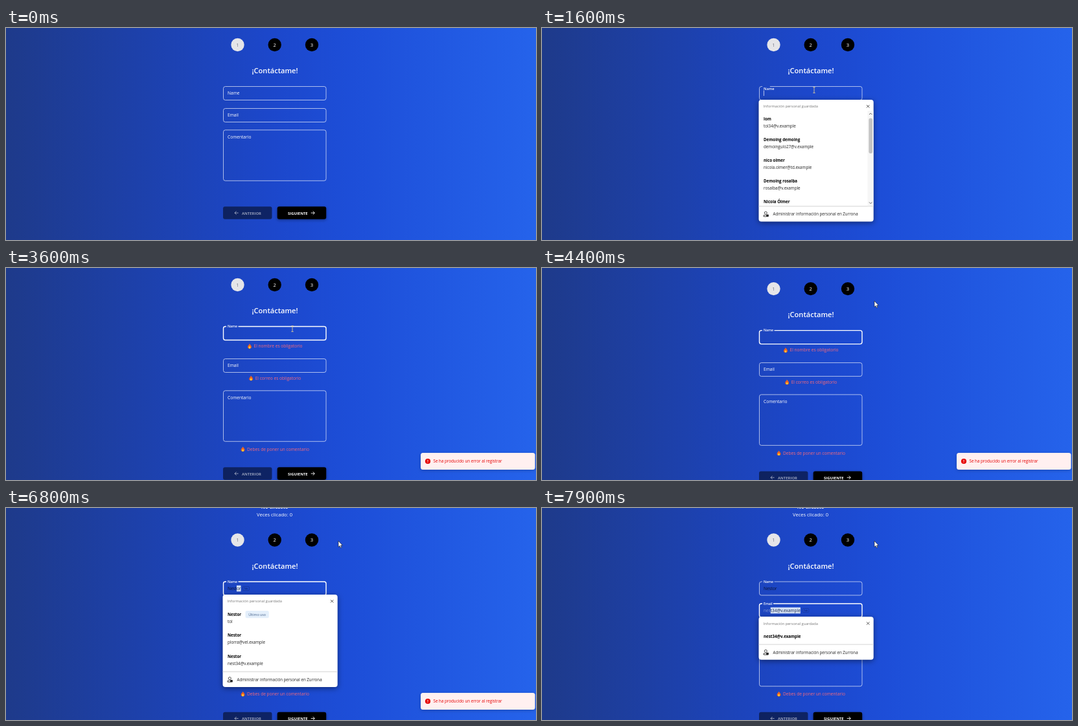
These frames come from a looping animation (818 px wide and 328 px high, 8000 ms). An HTML page with a canvas:

```html
<!DOCTYPE html>
<html lang="es">
<head>
<meta charset="utf-8">
<title>Formulario de contacto</title>
<style>
html, body { margin: 0; width: 100%; height: 100%; overflow: hidden; background: #1d4ed8; }
canvas { display: block; width: 818px; height: 328px; }
</style>
</head>
<body>
<canvas id="stage"></canvas>
<script>
const W = 818, H = 328, LOOP = 8000, STEP = 100;
const FONT = '"Open Sans", "Noto Sans", sans-serif';
const canvas = document.getElementById('stage');
const dpr = window.devicePixelRatio || 1;
canvas.width = W * dpr;
canvas.height = H * dpr;
const ctx = canvas.getContext('2d');

const CLICK_NAME = 1520, CLICK_OUT = 2100, SUBMIT = 2900, ACCEPT = 7100, FOCUS_EMAIL = 7200;
const NAME_KEYS = [5900, 6200, 6500, 6700];
const EMAIL_KEYS = [7500, 7700, 7800];
const NAME = 'Nestor', EMAIL = 'nest34@v.example';

const SAVED = [
  ['lom', 'tol34@v.example'],
  ['Demoing demoing', 'demoingulo27@v.example'],
  ['nico olmer', 'nicola.olmer@td.example'],
  ['Demoing rosalba', 'rosalba@v.example'],
  ['Nicola Ólmer', '']
];
const MATCHES = [[NAME, 'tol', true], [NAME, 'plorra@vel.example'], [NAME, EMAIL]];

// Pointer path: time, x, y
const PATH = [
  [1000, 584, 322], [1450, 420, 96], [1700, 420, 96], [2050, 520, 230], [2450, 520, 230],
  [2750, 458, 284], [2950, 458, 284], [3500, 442, 94], [3800, 442, 94], [4250, 513, 51]
];

const clamp = v => Math.max(0, Math.min(1, v));
const prog = (t, start, dur) => clamp((t - start) / dur);
const easeOut = p => 1 - (1 - p) * (1 - p);
const easeInOut = p => p * p * (3 - 2 * p);
const mix = (a, b, p) => a + (b - a) * p;
const count = (keys, t) => keys.filter(k => t >= k).length;

// y is the middle of the capital letters
function text(s, x, y, size, color, weight = 400, align = 'left') {
  ctx.font = `${weight} ${size}px ${FONT}`;
  ctx.textAlign = align;
  ctx.fillStyle = color;
  ctx.fillText(s, x, y + size * 0.35);
}

function textWidth(s, size) {
  ctx.font = `400 ${size}px ${FONT}`;
  return ctx.measureText(s).width;
}

function box(x, y, w, h, r) {
  ctx.beginPath();
  ctx.roundRect(x, y, w, h, r);
}

function fillBox(x, y, w, h, r, color) {
  box(x, y, w, h, r);
  ctx.fillStyle = color;
  ctx.fill();
}

function disc(x, y, r, color) {
  ctx.beginPath();
  ctx.arc(x, y, r, 0, Math.PI * 2);
  ctx.fillStyle = color;
  ctx.fill();
}

function lines(color, width, ...paths) {
  ctx.beginPath();
  for (const p of paths)
    for (let i = 0; i < p.length; i += 2) ctx[i ? 'lineTo' : 'moveTo'](p[i], p[i + 1]);
  ctx.strokeStyle = color;
  ctx.lineWidth = width;
  ctx.stroke();
}

function shadow(blur, dy, color) {
  ctx.shadowBlur = blur * dpr;
  ctx.shadowOffsetY = dy * dpr;
  ctx.shadowColor = color;
}

function background() {
  const g = ctx.createLinearGradient(0, 0, W, 0);
  g.addColorStop(0, '#1e3a8a');
  g.addColorStop(0.5, '#1c47cb');
  g.addColorStop(0.65, '#1d4ed8');
  g.addColorStop(1, '#2563eb');
  ctx.fillStyle = g;
  ctx.fillRect(0, 0, W, H);
}

function header(s) {
  text('No clicaste', 414.5, s - 25.5, 7.6, '#fff', 700, 'center');
  text('Veces clicado: 0', 414.5, s - 13.5, 7.6, '#fff', 400, 'center');
  [357.5, 414.7, 472].forEach((x, i) => {
    disc(x, 26 + s, 10.2, i ? '#000' : '#e5e5e8');
    text(String(i + 1), x, 26 + s, 7.6, i ? '#fff' : '#777a85', 400, 'center');
  });
  text('¡Contáctame!', 415, 66.5 + s, 11.1, '#fff', 600, 'center');
}

function field(label, y, h, float, focused, notch) {
  ctx.save();
  if (float > 0) {
    ctx.beginPath();
    ctx.rect(0, 0, W, H);
    ctx.rect(340, y - 3, notch * float, 6);
    ctx.clip('evenodd');
  }
  box(335.5, y + 0.5, 158.5, h - 1, 3);
  ctx.strokeStyle = focused ? '#fff' : 'rgba(255,255,255,.8)';
  ctx.lineWidth = focused ? 1.4 : 0.8;
  ctx.stroke();
  ctx.restore();
  text(label, 342, mix(y + 11, y + 0.3, float), mix(6.6, 5.2, float), '#fff', float > 0 ? 600 : 400);
}

function flame(x, y) {
  ctx.beginPath();
  ctx.moveTo(x - 0.6, y - 4);
  ctx.bezierCurveTo(x + 2, y - 2, x + 3.2, y, x + 2.9, y + 1.8);
  ctx.bezierCurveTo(x + 2.4, y + 4.3, x - 2.4, y + 4.3, x - 2.9, y + 1.8);
  ctx.bezierCurveTo(x - 3.1, y, x - 2, y - 0.8, x - 1.8, y - 1.8);
  ctx.quadraticCurveTo(x - 0.2, y - 1.6, x - 0.6, y - 4);
  ctx.fillStyle = '#f2641c';
  ctx.fill();
  ctx.beginPath();
  ctx.ellipse(x, y + 2, 1.4, 1.7, 0, 0, Math.PI * 2);
  ctx.fillStyle = '#ffd23c';
  ctx.fill();
}

function problem(s, y) {
  const x = 415 - (textWidth(s, 6.6) + 10) / 2;
  flame(x + 3.5, y);
  text(s, x + 10, y, 6.6, '#f8697a');
}

function arrow(x, y, dir, color) {
  const tip = x + dir * 2.8;
  lines(color, 0.9, [x - dir * 2.8, y, tip, y], [tip - dir * 2.6, y - 2.6, tip, y, tip - dir * 2.6, y + 2.6]);
}

function buttons(y) {
  fillBox(335, y, 75.5, 19.5, 3, 'rgba(0,0,0,.5)');
  arrow(355.8, y + 9.8, -1, 'rgba(255,255,255,.6)');
  text('ANTERIOR', 364, y + 10.2, 5.9, 'rgba(255,255,255,.55)', 700);
  ctx.save();
  shadow(4, 1.5, 'rgba(0,0,0,.35)');
  fillBox(418.7, y, 75.5, 19.5, 3, '#000');
  ctx.restore();
  text('SIGUIENTE', 435, y + 10.2, 5.9, '#fff', 700);
  arrow(473.5, y + 9.8, 1, '#fff');
}

// Typed letters followed by the selected completion and its key hint
function completion(full, n, y, color) {
  const size = 6.5, typed = full.slice(0, n), rest = full.slice(n);
  const x = 342 + textWidth(typed, size), w = textWidth(rest, size);
  text(typed, 342, y, size, color);
  fillBox(x, y - 4.7, w, 9.4, 0, '#d3e0f6');
  text(rest, x, y, size, '#1c2a4c');
  box(x + w + 3, y - 3, 10, 6, 1.5);
  ctx.strokeStyle = 'rgba(10,20,60,.45)';
  ctx.lineWidth = 0.5;
  ctx.stroke();
  text('Tab', x + w + 8, y, 3.6, 'rgba(10,20,60,.7)', 400, 'center');
}

function popup(y, h) {
  ctx.save();
  shadow(8, 2, 'rgba(0,0,0,.45)');
  fillBox(334.5, y, 177.2, h, 4, '#fff');
  ctx.restore();
  text('Información personal guardada', 341.7, y + 10.4, 5.73, '#767676');
  lines('#333', 0.8, [501, y + 8, 505.4, y + 12.4], [505.4, y + 8, 501, y + 12.4]);
  const base = y + h;
  lines('#d0d0d0', 0.9, [334.5, base - 23.7, 511.7, base - 23.7]);
  ctx.beginPath();
  ctx.arc(345.3, base - 13.4, 2, 0, Math.PI * 2);
  ctx.strokeStyle = '#222';
  ctx.lineWidth = 0.8;
  ctx.stroke();
  lines('#222', 0.8, [346.5, base - 7.6, 342, base - 7.8, 342, base - 9.8, 345.5, base - 9.8]);
  fillBox(346, base - 11, 3.8, 3.6, 0.8, '#222');
  text('Administrar información personal en Zurrona', 356.5, base - 11.4, 6.2, '#222');
}

function entry([title, detail, recent], y) {
  text(title, 342, y, 6.2, '#000', 700);
  if (detail) text(detail, 342, y + 11.2, 6.25, '#222');
  if (recent) {
    fillBox(369.5, y - 5.6, 36.3, 11.4, 2.5, '#e4effb');
    text('Último uso', 387.6, y + 0.2, 5.3, '#45628c', 400, 'center');
  }
}

function savedPopup(y) {
  popup(y, 188.5);
  ctx.save();
  ctx.beginPath();
  ctx.rect(334.5, y + 16, 177, 148.3);
  ctx.clip();
  SAVED.forEach((e, i) => entry(e, y + 30 + i * 32));
  ctx.fillStyle = '#f6f6f6';
  ctx.fillRect(502.5, y + 17, 9, 148);
  fillBox(504.4, y + 28.5, 5.6, 54.5, 2.8, '#c3c3c3');
  lines('#444', 0.8, [505, y + 23, 507.2, y + 20.8, 509.4, y + 23], [505, y + 158.5, 507.2, y + 160.7, 509.4, y + 158.5]);
  ctx.restore();
}

function toast(t) {
  const shown = easeOut(prog(t, SUBMIT + 50, 400)), left = easeInOut(prog(t, 6950, 300));
  const alpha = shown * (1 - left);
  if (!alpha) return;
  const y = 286 + 42 * (1 - shown) + 30 * left;
  ctx.save();
  ctx.globalAlpha = alpha;
  ctx.save();
  shadow(5, 1.5, 'rgba(0,0,0,.2)');
  fillBox(640, y, 176.5, 26, 3.5, '#fff0f0');
  ctx.restore();
  disc(651, y + 13, 4.1, '#e60000');
  ctx.fillStyle = '#fff0f0';
  ctx.fillRect(650.5, y + 10.7, 1, 2.9);
  ctx.fillRect(650.5, y + 14.4, 1, 1);
  text('Se ha producido un error al registrar', 659.5, y + 13, 6.25, '#e60000');
  ctx.restore();
}

function pointer(t) {
  if (t < PATH[0][0]) return;
  let [, x, y] = PATH[PATH.length - 1];
  for (let i = 1; i < PATH.length; i++) {
    const [t0, x0, y0] = PATH[i - 1], [t1, x1, y1] = PATH[i];
    if (t >= t0 && t < t1) {
      const p = easeInOut(prog(t, t0, t1 - t0));
      x = mix(x0, x1, p);
      y = mix(y0, y1, p);
      break;
    }
  }
  if (x > 335 && x < 494 && y > 90 && y < 112) {
    lines('#d6c79c', 0.9, [x - 1.7, y - 4.4, x + 1.7, y - 4.4], [x, y - 4.4, x, y + 4.4], [x - 1.7, y + 4.4, x + 1.7, y + 4.4]);
    return;
  }
  ctx.beginPath();
  [[0, 0], [0, 9.3], [2.1, 7.4], [3.5, 10.6], [5, 9.9], [3.6, 6.9], [6.3, 6.7]]
    .forEach(([dx, dy], i) => ctx[i ? 'lineTo' : 'moveTo'](x + dx, y + dy));
  ctx.closePath();
  ctx.fillStyle = '#fff';
  ctx.fill();
  ctx.strokeStyle = '#111';
  ctx.lineWidth = 0.6;
  ctx.stroke();
}

function caret(t, since, y) {
  if ((t - since) % 1000 < 500) lines('#fff', 0.7, [342.4, y - 4.2, 342.4, y + 4.2]);
}

function draw(t) {
  const scroll = 23.5 * easeInOut(prog(t, 4300, 300));
  const nameKeys = count(NAME_KEYS, t), emailKeys = count(EMAIL_KEYS, t);
  const failed = t >= SUBMIT, nameBad = failed && !nameKeys;
  const firstFocus = t >= CLICK_NAME && t < CLICK_OUT;
  const nameFocus = firstFocus || (failed && t < FOCUS_EMAIL);
  const since = failed ? SUBMIT : CLICK_NAME;

  let nameFloat = 0;
  if (failed) nameFloat = easeOut(prog(t, SUBMIT, 200));
  else if (t >= CLICK_NAME) nameFloat = easeOut(prog(t, CLICK_NAME, 200)) * (1 - easeOut(prog(t, CLICK_OUT, 200)));
  const emailFloat = easeOut(prog(t, FOCUS_EMAIL, 200));

  const nameY = 90 + scroll;
  const emailY = 124 + scroll + (nameBad ? 16 : 0);
  const noteY = emailY + 33.3 + (failed ? 16 : 0);

  background();
  header(scroll);
  field('Name', nameY, 22, nameFloat, nameFocus && nameFloat === 1, 18.5);
  field('Email', emailY, 22, emailFloat, t >= FOCUS_EMAIL, 17);
  field('Comentario', noteY, 79.5, 0, false, 0);
  if (nameBad) problem('El nombre es obligatorio', nameY + 31);
  if (failed) {
    problem('El correo es obligatorio', emailY + 46.5 - 16);
    problem('Debes de poner un comentario', noteY + 91);
  }
  buttons(noteY + 119);

  if (t >= ACCEPT) text(NAME, 342, nameY + 11, 6.5, '#0b1230');
  else if (nameKeys) completion(NAME, nameKeys, nameY + 11, '#0b1230');
  else if (nameFocus) caret(t, since, nameY + 10.8);

  if (emailKeys) completion(EMAIL, emailKeys, emailY + 11, '#8093cf');
  else if (t >= FOCUS_EMAIL) caret(t, FOCUS_EMAIL, emailY + 10.8);

  if (firstFocus) savedPopup(nameY + 21);
  if (nameKeys && t < ACCEPT) {
    popup(nameY + 20.5, 143);
    MATCHES.forEach((e, i) => entry(e, nameY + 51 + i * 32.5));
  }
  if (emailKeys) {
    popup(emailY + 4.8 + 16, 66.5);
    entry([EMAIL, ''], emailY + 51);
  }
  toast(t);
  pointer(t);
}

const start = performance.now();
function tick() {
  const t = (performance.now() - start) % LOOP;
  ctx.setTransform(dpr, 0, 0, dpr, 0, 0);
  draw(Math.floor(t / STEP) * STEP);
  requestAnimationFrame(tick);
}
tick();
</script>
</body>
</html>
```
